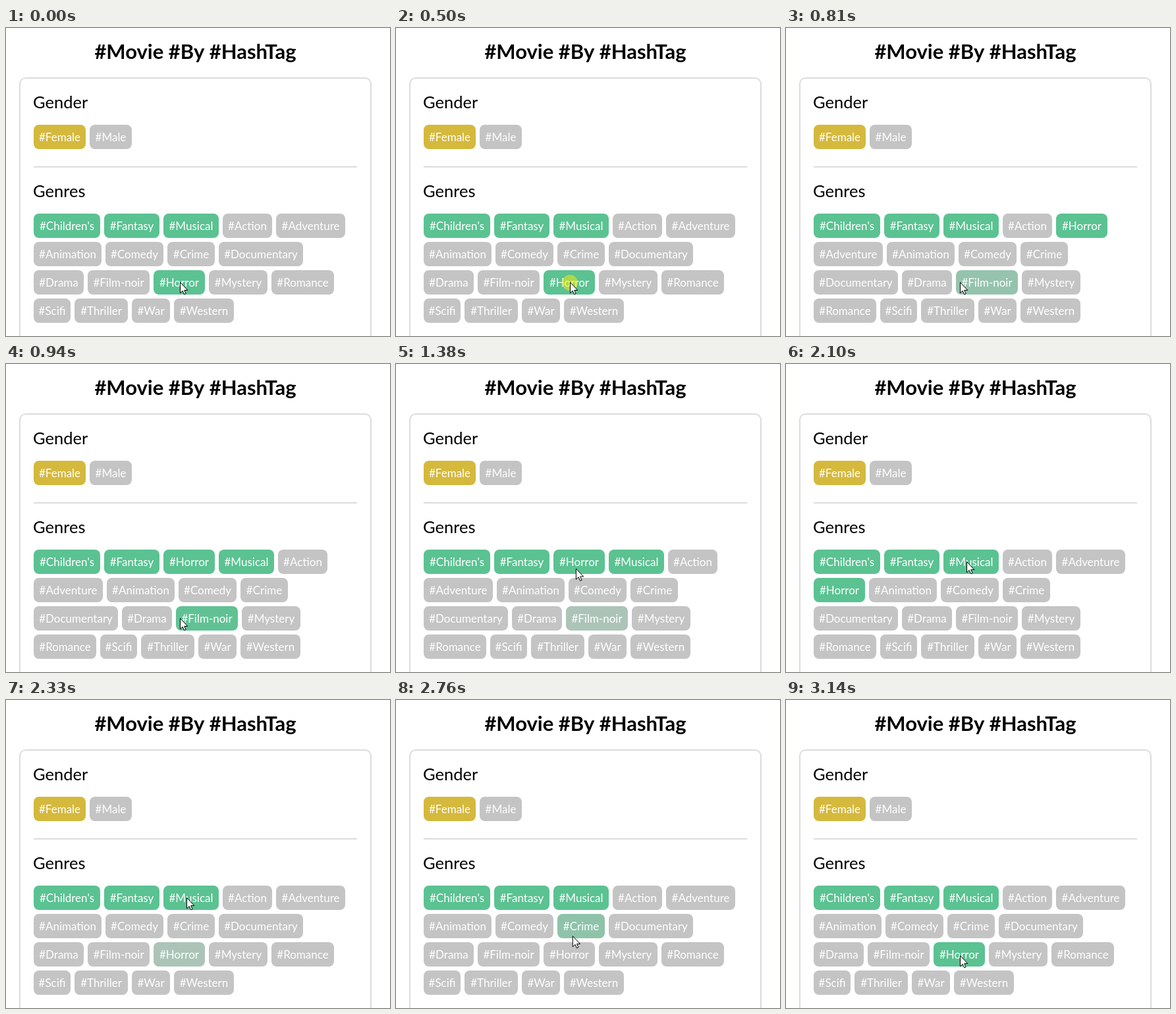
Write an HTML page with a canvas that moves like this. It is 583x468 px and loops after 3.2 s.

```html
<!DOCTYPE html>
<html lang="en">
<head>
<meta charset="utf-8">
<title>Movie tags</title>
<style>
html, body { margin: 0; width: 100%; height: 100%; overflow: hidden; background: #fff; }
canvas { display: block; }
</style>
</head>
<body>
<canvas id="stage" width="583" height="468"></canvas>
<script>
const ctx = document.getElementById('stage').getContext('2d');
const LOOP = 3200;
const GREY = [196, 196, 196], GREEN = [91, 194, 146], GOLD = [212, 185, 61];

const TICKS = [0, 70, 160, 500, 650, 720, 800, 870, 940, 1020, 1090, 1160,
  1240, 1310, 1380, 1450, 1530, 1600, 1750, 1900, 2040, 2100, 2180, 2260,
  2330, 2410, 2480, 2550, 2620, 2700, 2770, 2840, 2910, 2980, 3050, 3140];

// Tag name and chip width, selected ones first
const TAGS = [["Children's", 101], ['Fantasy', 84], ['Musical', 84],
  ['Action', 75], ['Adventure', 105], ['Animation', 103], ['Comedy', 88],
  ['Crime', 72], ['Documentary', 128], ['Drama', 76], ['Film-noir', 94],
  ['Mystery', 89], ['Romance', 95], ['Scifi', 56], ['Thriller', 81],
  ['War', 58], ['Western', 91]];
const HORROR = ['Horror', 78];
const HIGH = 2, LOW = 11;

const clamp = (v, a = 0, b = 1) => Math.min(b, Math.max(a, v));
const lerp = (a, b, p) => a + (b - a) * p;
const mix = (a, b, p) => `rgb(${a.map((v, i) => Math.round(lerp(v, b[i], p)))})`;
const smooth = p => p * p * (3 - 2 * p);

// CSS "ease": cubic-bezier(.25, .1, .25, 1)
function ease(x) {
  if (x <= 0 || x >= 1) return clamp(x);
  let lo = 0, hi = 1, s;
  for (let i = 0; i < 20; i++) {
    s = (lo + hi) / 2;
    const bx = 0.75 * s * (1 - s) + s ** 3;
    if (bx < x) lo = s; else hi = s;
  }
  return 0.3 * s * (1 - s) ** 2 + 3 * s * s * (1 - s) + s ** 3;
}

const fade = (t, start) => ease((t - start) / 300);

function horrorIndex(t) {
  const moves = start => Math.floor((t - start) / 20);
  return t < 2040 ? clamp(LOW - moves(650), HIGH, LOW)
                  : clamp(HIGH + moves(2040), HIGH, LOW);
}

function greenness(name, t) {
  switch (name) {
    case "Children's": case 'Fantasy': case 'Musical': return 1;
    case 'Horror': return t < 2190 ? 1 : t < 2840 ? 1 - fade(t, 2190) : fade(t, 2840);
    case 'Film-noir': return t < 1240 ? fade(t, 720) : 1 - fade(t, 1240);
    case 'Crime': return t < 2750 ? fade(t, 2610) : fade(2750, 2610) * (1 - fade(t, 2750));
  }
  return 0;
}

function cursorAt(t) {
  if (t < 1165) return [264.5, 386.5];
  if (t < 1750) {
    const p = 1 - (1 - clamp((t - 1165) / 415)) ** 3;
    return [lerp(264.5, 274.5, p), lerp(386.5, 301.5, p)];
  }
  if (t < 2910) {
    const p = smooth(clamp((t - 2410) / 500));
    return [lerp(274.5, 264.5, p), lerp(300.5, 394.5, p)];
  }
  return [264.5, lerp(394.5, 388.5, smooth(clamp((t - 2910) / 230)))];
}

function text(str, x, y, font, color = '#000', align = 'left') {
  ctx.font = font + ' Lato, sans-serif';
  ctx.fillStyle = color;
  ctx.textAlign = align;
  ctx.fillText(str, x, y);
}

function chip(name, x, y, w, color) {
  ctx.fillStyle = color;
  ctx.beginPath();
  ctx.roundRect(x, y, w, 37, 8);
  ctx.fill();
  text('#' + name, x + w / 2, y + 25, '17px', '#fff', 'center');
}

function drawGenres(t) {
  const list = TAGS.slice();
  list.splice(horrorIndex(t), 0, HORROR);
  let x = 42, y = 282;
  for (const [name, w] of list) {
    if (x + w > 532) { x = 42; y += 43; }
    chip(name, x, y, w, mix(GREY, GREEN, greenness(name, t)));
    x += w + 6;
  }
}

function drawCursor(x, y) {
  const pts = [[0, 0], [0, 16.3], [3.7, 12.8], [6.2, 18.3], [8.6, 17.3], [6.2, 12], [11.3, 12]];
  ctx.beginPath();
  for (const [dx, dy] of pts) ctx.lineTo(x + dx, y + dy);
  ctx.closePath();
  ctx.fillStyle = '#fff';
  ctx.fill();
  ctx.strokeStyle = '#000';
  ctx.lineWidth = 1;
  ctx.stroke();
}

function drawClick(x, y) {
  ctx.fillStyle = 'rgba(255, 237, 0, 0.5)';
  ctx.beginPath();
  ctx.arc(x, y, 12, 0, Math.PI * 2);
  ctx.fill();
}

function drawPage() {
  ctx.fillStyle = '#fff';
  ctx.fillRect(0, 0, 583, 468);
  text('#Movie #By #HashTag', 287.5, 47, 'bold 31px', '#000', 'center');
  ctx.strokeStyle = '#dcdcdc';
  ctx.lineWidth = 2;
  ctx.beginPath();
  ctx.roundRect(21, 76, 533, 460, 9);
  ctx.stroke();
  text('Gender', 41, 122, '25.5px');
  chip('Female', 42, 147, 79, mix(GOLD, GOLD, 0));
  chip('Male', 127, 147, 64, mix(GREY, GREY, 0));
  ctx.fillStyle = '#dcdcdc';
  ctx.fillRect(42, 210, 491, 2);
  text('Genres', 41, 257, '25.5px');
}

function draw(now) {
  const clock = now % LOOP;
  const t = TICKS.findLast(v => v <= clock) ?? 0;
  drawPage();
  drawGenres(t);
  if (t >= 500 && t < 650) drawClick(264, 387);
  if (t >= 1900 && t < 2040) drawClick(274, 301);
  drawCursor(...cursorAt(t));
}

const begin = performance.now();
function loop() {
  draw(performance.now() - begin);
  requestAnimationFrame(loop);
}
loop();
</script>
</body>
</html>
```
